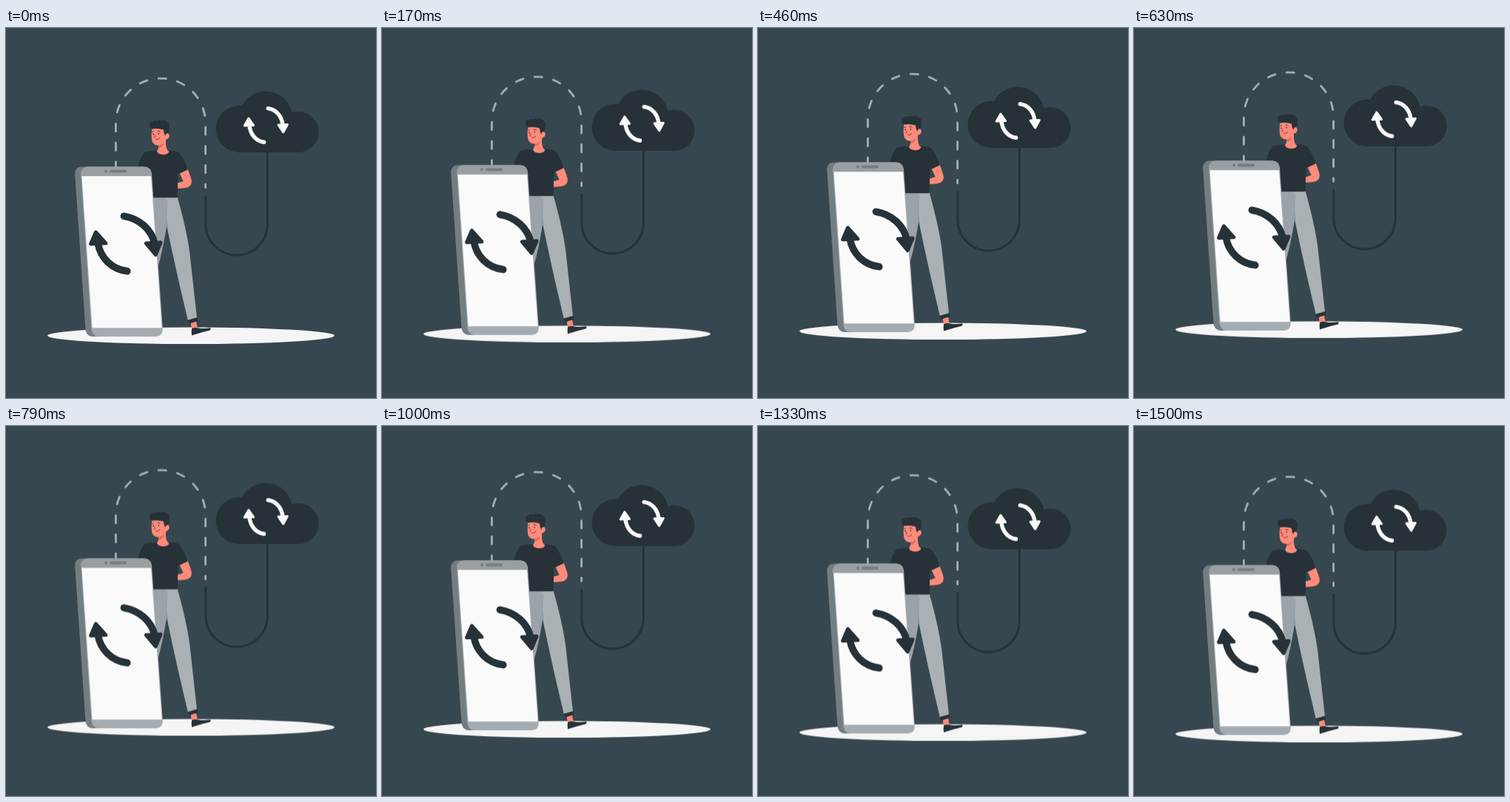
These frames come from a looping animation (500 by 500 pixels, 1540 ms). An HTML page:

```html
<!DOCTYPE html>
<html lang="en">
<head>
<meta charset="utf-8">
<title>Cloud sync</title>
<style>
  html, body { margin: 0; width: 100%; height: 100%; overflow: hidden; background: #37474f; }
  svg { display: block; width: 100%; height: 100%; }
  #scene { animation: hover 770ms linear -45ms infinite alternate; }
  @keyframes hover {
    from { transform: translateY(0.6px); }
    to { transform: translateY(-9.4px); }
  }
  .ink { fill: #263238; }
  .skin { fill: #ff8b7b; }
  .line { fill: none; stroke: #263238; stroke-linecap: round; stroke-linejoin: round; }
  .arrow path { stroke-linecap: round; stroke-linejoin: round; }
  .arrow .shaft { fill: none; }
  .dark { stroke: #263238; fill: #263238; }
  .light { stroke: #fafafa; fill: #fafafa; }
</style>
</head>
<body>
<svg viewBox="0 0 500 500">
  <g id="scene">
    <ellipse cx="250" cy="415.8" rx="194" ry="11.3" fill="#f5f5f5"/>

    <!-- links -->
    <path d="M148.4 191.4V128.6a60.6 60.6 0 0 1 121.2 0V215.6" fill="none" stroke="#a6aeb3"
      stroke-width="2.8" stroke-linecap="round" stroke-dasharray="10.4 15.4"/>
    <path class="line" stroke-width="2.9" d="M269.8 227.5V265.3a41.8 41.8 0 0 0 83.6 0V165"/>

    <!-- cloud -->
    <g class="ink">
      <circle cx="315.2" cy="136.4" r="31.6"/>
      <circle cx="351" cy="121.4" r="36"/>
      <circle cx="395" cy="140.5" r="27.5"/>
      <path d="M315 128H395V168H315z"/>
    </g>
    <g class="arrow light">
      <path class="shaft" stroke-width="5.4" d="M354.2 108.6C365 110 372.5 119 374 131"/>
      <path stroke-width="3" d="M368 131L380.3 130.5L374.7 140.8z"/>
      <path class="shaft" stroke-width="5.4" d="M348.6 154.3C338 153 330 144 328.8 131"/>
      <path stroke-width="3" d="M322.2 132L334.6 131.6L327.9 122z"/>
    </g>

    <!-- man -->
    <path fill="#9ba3a8" d="M196 228H218L217 268Q212 300 205 324L196 330z"/>
    <path fill="#a9b1b5" d="M216 228H231.5Q247 283 249.6 316L258 391.5L245.8 395Q229 325 217.4 268z"/>
    <path fill="none" stroke="#8c959a" stroke-width=".8" d="M217.5 232Q216 245 217.2 266"/>
    <path class="skin" d="M249.6 398L257 396.5L258.8 406L251 407z"/>
    <path class="ink" d="M245.2 395L258 391.3L259.4 395.7L247.6 399.6z"/>
    <path class="ink" d="M251.2 406Q255 404.4 260 405.4Q268 406.5 275.6 405.2Q277.6 406.6 275.6 408.4L264 411.6L251 415.6Q250 410 251.2 406z"/>
    <path class="skin" d="M234 195L245.4 190.5Q250.6 203 250.9 207.6Q250.6 215 243 216Q231 217.6 219.5 216.2Q215 214.8 208 214L207.6 207.2Q214 205.7 217.5 209L221.5 210.2Q232 210.2 239.6 207z"/>
    <path class="ink" d="M204 166Q194 165.6 187.6 167.6Q182 174 178.6 186L178 200L198 229.3H231.6L232.4 197L235.4 196.2L245.4 191.4Q241.5 177 234 168.4Q228 165.3 218 165.6z"/>
    <path class="skin" d="M206.4 155Q207.2 163 203.8 166.6Q206 171.4 213 171.2Q219 170.8 220.4 167Q215.2 164.6 216 150z"/>
    <path fill="#d9695f" d="M206.8 158Q211 157.6 214 154Q212.6 160 207.2 162z"/>
    <path class="skin" d="M197.2 136Q196 147 197.4 153Q199.6 159 206.4 158.7Q213 157.6 215.4 151Q220.6 150 220.8 145.6Q220 140.6 216.4 142.4L214 134z"/>
    <path class="ink" d="M197.4 136.6Q193.4 134 194.4 129.4Q193.6 126.6 197.6 126.8Q200 123.8 204 125.8Q207.6 123.8 210.6 125.4Q215.4 123.7 217.8 127Q221.6 128.6 220.6 134Q221.6 139 218.4 142.2Q215.6 142 215.2 146Q213 142 213 137.6Q205 135 197.4 136.6z"/>
    <g class="ink">
      <circle cx="199" cy="143.4" r=".9"/>
      <circle cx="206.2" cy="142.8" r=".9"/>
    </g>
    <path class="line" stroke-width=".8" d="M197.5 140.4L199.6 139.6M205 139.4Q207 138.6 208.4 140.2"/>
    <path class="line" stroke-width=".7" d="M202.6 150.6Q206 151 207.8 148.6"/>
    <path fill="#de5753" d="M201.6 143Q199.8 146 199 148.2Q200.4 149 201.8 148.4z"/>

    <!-- phone -->
    <path fill="#737d82" d="M112 187.5H102Q92.6 188 93.2 198L107.4 407Q108.4 416.6 117 417H130z"/>
    <path fill="#a5acb1" d="M110.5 187.5H187Q196.2 188 197 197.5L211.8 406Q212.2 416.6 202.6 417H125Q116.4 416.4 115.4 407L101.3 198Q101 188 110.5 187.5z"/>
    <path fill="#9a9fa3" d="M110.5 187.5H187Q196.2 188 197 197.5L197.2 200.2H101.5L101.3 198Q101 188 110.5 187.5z"/>
    <path fill="#fafafa" d="M102.4 200.2H196L210.6 405.3H116.6z"/>
    <circle cx="135" cy="193.4" r="2" fill="#737d82"/>
    <rect x="140" y="191.4" width="23" height="4" rx="2" fill="#737d82"/>
    <g class="arrow dark">
      <path class="shaft" stroke-width="9.6" d="M159.4 254.2C180 257.6 197 272 201 292"/>
      <path stroke-width="5" d="M189.2 291L209 290L202.2 306.4z"/>
      <path class="shaft" stroke-width="9.6" d="M163.8 328.6C143 326 127.5 311 124 290"/>
      <path stroke-width="5" d="M114.6 291.8L134.8 290.8L121.4 275.8z"/>
    </g>
  </g>
</svg>
</body>
</html>
```
